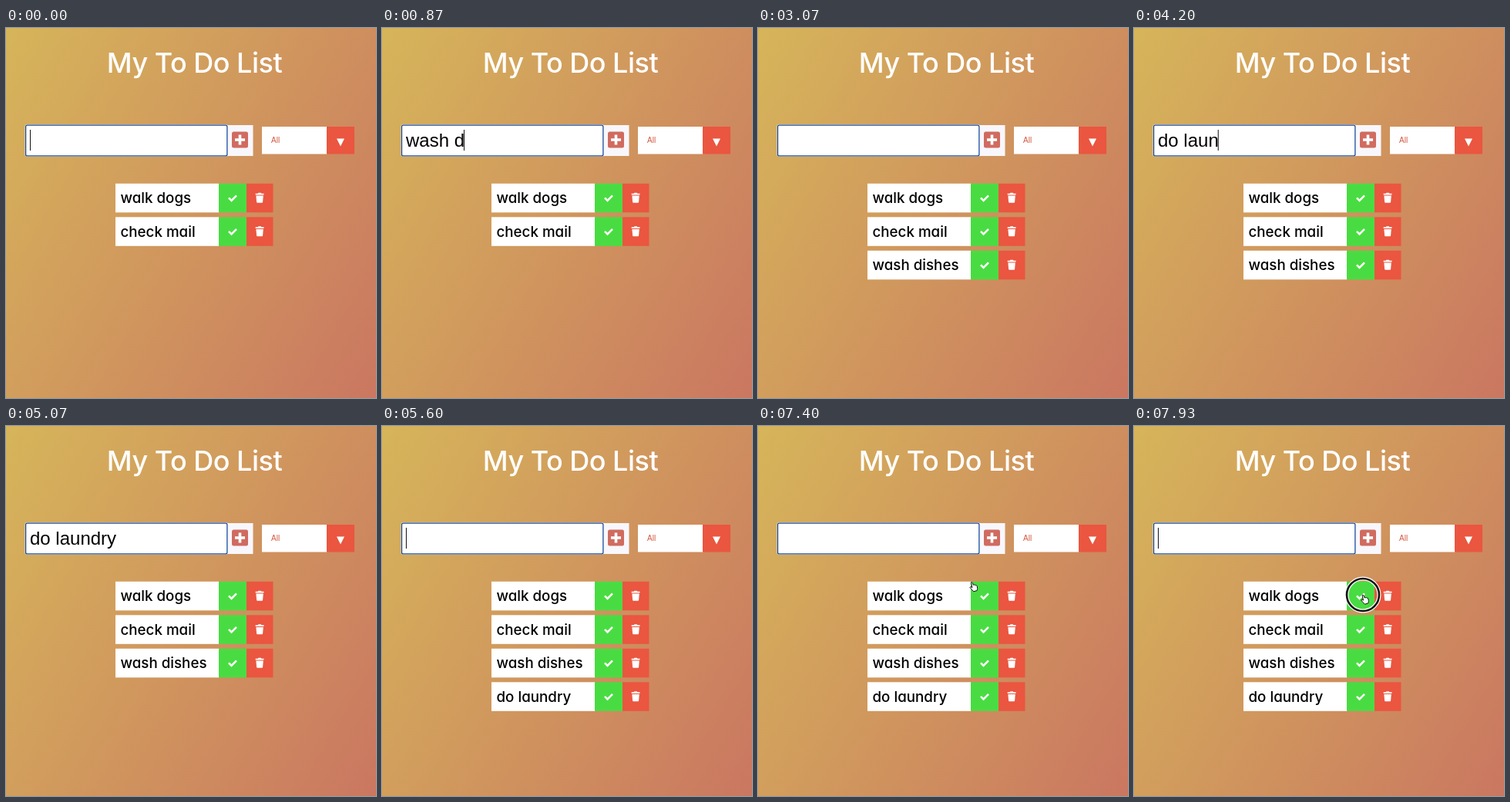
These frames come from a looping animation (480 by 480 pixels, 8 s). An HTML page:

```html
<!DOCTYPE html>
<html lang="en">
<head>
<meta charset="utf-8">
<title>To-do list</title>
<style>
  html, body { margin: 0; width: 100%; height: 100%; overflow: hidden; }
  body { background: linear-gradient(120deg, #d6b55a, #ca7761); }
  svg { display: block; width: 480px; height: 480px; }
  text { white-space: pre; }
  .ui { font-family: Inter, "Open Sans", sans-serif; font-weight: 500; font-feature-settings: "cv11"; }
  .field { font-family: "Liberation Sans", Arial, sans-serif; }
</style>
</head>
<body>
<svg viewBox="0 0 480 480">
  <defs>
    <g id="buttons">
      <rect width="134.5" height="37.5" fill="#fff"/>
      <rect x="134" width="36" height="37.5" fill="#49dc42"/>
      <rect x="170" width="34.5" height="37.5" fill="#ea5640"/>
      <path d="M147 18.5l3.5 3.5 6.5-6.5" fill="none" stroke="#fff" stroke-width="2.6"/>
      <path d="M181.7 13h3l.8-1h3.2l.8 1h3v1.8h-10.8zM182.4 15.6h9.4l-.7 8.4q-.1.9-1 .9h-6q-.9 0-1-.9z" fill="#fff"/>
    </g>
  </defs>
  <text class="ui" x="244.5" y="58" font-size="36" letter-spacing="-.5" text-anchor="middle" fill="#fff">My To Do List</text>

  <rect x="287" y="126" width="33.5" height="40" fill="#f7f7fc"/>
  <rect x="293" y="134.5" width="21" height="21" rx="2.5" fill="#d06b60"/>
  <path d="M303.5 138.5v13M297 145h13" stroke="#fff" stroke-width="3.6"/>
  <rect x="24.5" y="125" width="263.5" height="42" rx="3" fill="#fff" fill-opacity=".75"/>
  <rect x="25.6" y="126.1" width="261.3" height="39.8" rx="2" fill="#fff" stroke="#194a9f" stroke-width="1.3"/>
  <text id="entry" class="field" x="31" y="154" font-size="24"></text>
  <rect id="caret" y="132" width="1" height="27" fill="#111"/>

  <rect x="332" y="128" width="84.5" height="35.5" fill="#fff"/>
  <rect x="416" y="128" width="36" height="35.5" fill="#ea5640"/>
  <text class="field" x="344" y="149.3" font-size="10" fill="#d4573f">All</text>
  <path d="M429 143.5h10l-5 10z" fill="#fff"/>

  <g id="list"></g>

  <circle id="halo" cx="297" cy="219" fill="none" stroke="#fff" stroke-width="5"/>
  <circle id="ring" cx="297" cy="219" fill="none" stroke="#111" stroke-width="2.6"/>
  <g id="pointer">
    <path id="beam" d="M-2.5-5.5q2 0 2.5 1.2 .5-1.2 2.5-1.2M0-4.3v9M-2.5 5.7q2 0 2.5-1 .5 1 2.5 1M-1.5 2.2h3" fill="none" stroke="#222"/>
    <path id="arrow" d="M0-5v12l2.8-2.6 1.9 4.2 1.9-.8-1.9-4.1h3.8z" fill="#111" stroke="#fff" stroke-width=".8"/>
    <path id="hand" d="M-2-4.5q1-1 1.8.2l1.2 3q1-.8 1.7.1 1-.6 1.6.3 1.2-.3 1.5.9l.5 2.6q.2 1.6-.6 3.4l-4.3 1.2q-2.5-2.6-4.8-5.3 .2-1.5 2-.4l.9.6z" fill="#fff" stroke="#111"/>
  </g>
</svg>
<script>
const LOOP = 8000;
const $ = id => document.getElementById(id);
const show = (el, on) => el.setAttribute("visibility", on ? "visible" : "hidden");
const set = (el, attrs) => { for (const k in attrs) el.setAttribute(k, attrs[k]); };

// Key times for each typed entry; "end" submits it to the list.
const entries = [
  { text: "wash dishes", keys: [70, 200, 330, 470, 670, 800, 930, 1070, 1200, 1400, 1600], end: 2330 },
  { text: "do laundry", keys: [3330, 3400, 3600, 3800, 3930, 4070, 4200, 4270, 4470, 4600], end: 5600 }
];
// The caret is hidden during these spans.
const caretOff = [[2000, 2600], [3070, 3330], [5070, 5600], [6070, 6600], [7130, 7670]];

const items = [["walk dogs", 0], ["check mail", 0], ...entries.map(e => [e.text, e.end])];
$("list").innerHTML = items.map(([label], i) =>
  `<g transform="translate(142 ${201.8 + 43.5 * i})"><use href="#buttons"/>
   <text class="ui" x="6.5" y="25.3" font-size="18.75">${label}</text></g>`).join("");
const rows = [...$("list").children];

function drawPointer(t) {
  const p = Math.min(1, Math.max(0, (t - 7000) / 600));
  const k = p * p * (3 - 2 * p);
  const x = 221.5 + 76.5 * k, y = 160 + 64 * k;
  const inField = y < 166, onButton = x > 276 && y > 202;
  const onScreen = t >= 7000;
  set($("pointer"), { transform: `translate(${x} ${y})` });
  show($("beam"), onScreen && inField);
  show($("arrow"), onScreen && !inField && !onButton);
  show($("hand"), onScreen && onButton);

  const r = 16 + 5 * Math.min(1, Math.max(0, (t - 7870) / 60));
  for (const id of ["halo", "ring"]) {
    set($(id), { r });
    show($(id), t >= 7870);
  }
}

function draw(now) {
  const t = now % LOOP;
  const entry = entries.find(e => t >= e.keys[0] && t < e.end);
  const typed = entry ? entry.text.slice(0, entry.keys.filter(k => k <= t).length) : "";
  $("entry").textContent = typed;
  set($("caret"), { x: 31 + (typed ? $("entry").getComputedTextLength() - 1 : 0) });
  show($("caret"), !caretOff.some(([a, b]) => t >= a && t < b));
  rows.forEach((row, i) => show(row, t >= items[i][1]));
  drawPointer(t);
}

const start = performance.now();
(function tick() {
  draw(performance.now() - start);
  requestAnimationFrame(tick);
})();
</script>
</body>
</html>
```
